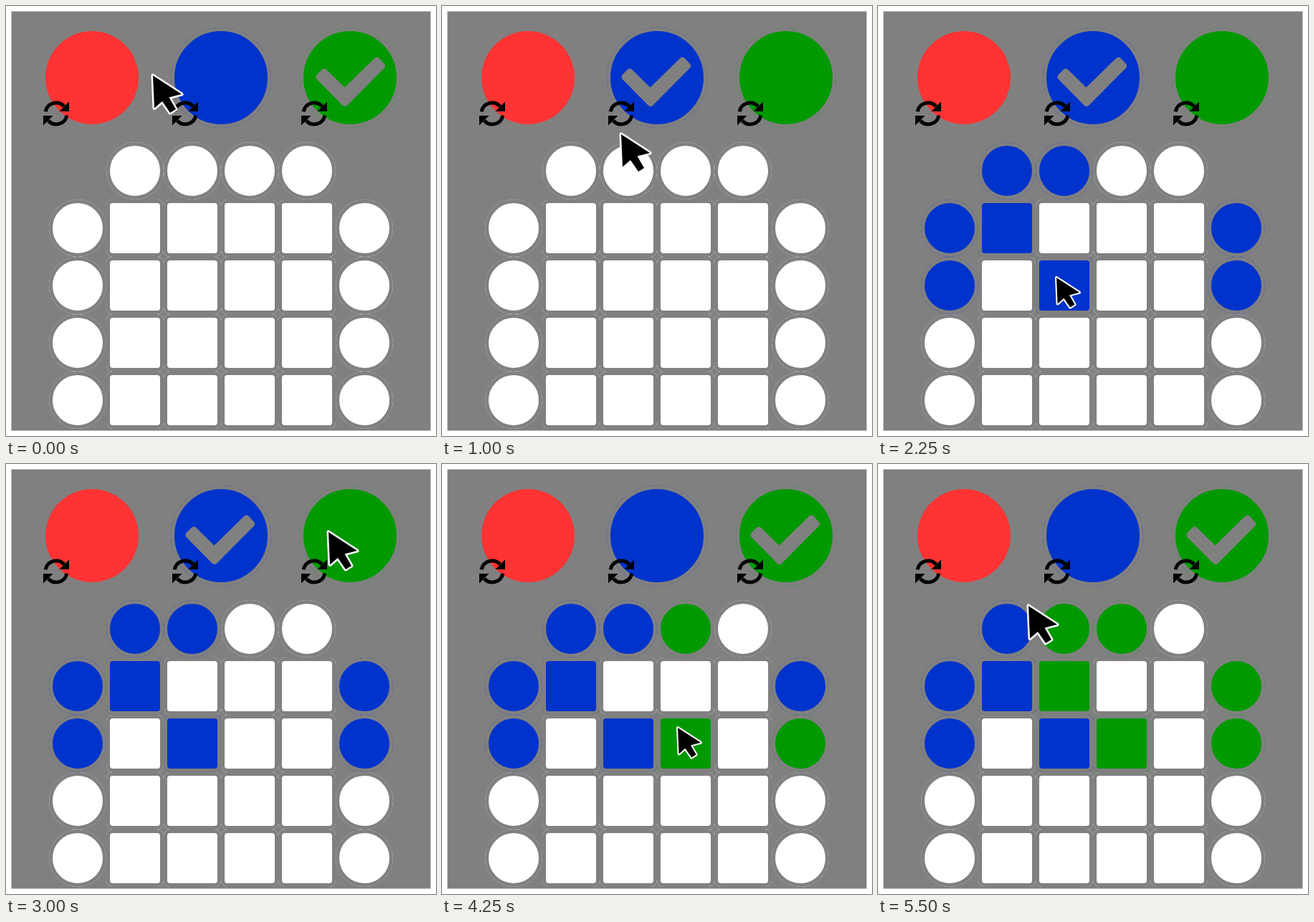
An HTML page that plays this animation: 600 by 600 pixels, repeating every 5750 ms.

```html
<!DOCTYPE html>
<html lang="en">
<head>
<meta charset="utf-8">
<title>Colour grid</title>
<style>
  html, body { margin: 0; width: 100%; height: 100%; overflow: hidden; background: #fff; }
  svg { display: block; width: 100vw; height: 100vh; }
  .frame { fill: none; stroke: #808080; stroke-width: 5; }
  .check { fill: #808080; stroke: #808080; stroke-width: 9; stroke-linejoin: round; }
  .arc { fill: none; stroke: #000; stroke-width: 5; }
  .cursor { fill: #000; stroke: #fff; stroke-width: 5; paint-order: stroke; stroke-linejoin: round; }
</style>
</head>
<body>
<svg id="stage" viewBox="0 0 600 600">
  <defs>
    <g id="arrow">
      <path class="arc" d="M-14.8 -2.6A14.9 14.9 0 0 1 11 -10"/>
      <path d="M18 -16.5V-3H4.5Z"/>
    </g>
    <g id="reload">
      <use href="#arrow"/>
      <use href="#arrow" transform="rotate(180)"/>
    </g>
  </defs>
  <rect x="7.5" y="7.5" width="585" height="585" fill="#808080"/>
  <g id="board"></g>
  <path id="check" class="check" d="M-45 -1L-38 -8L-9.5 20L35.5 -24L42.5 -16.5L-9 35.5Z"/>
  <g id="icons"></g>
  <path id="cursor" class="cursor" d="M0 0L2 45.5L13 36L24 52L32 47L22.5 30.5L40 26Z"/>
</svg>
<script>
const RED = '#ff3333', BLUE = '#0033cc', GREEN = '#009900', WHITE = '#ffffff';
const STEP = 250;
const $ = id => document.getElementById(id);
const board = $('board');

function add(parent, tag, attrs) {
  const el = document.createElementNS('http://www.w3.org/2000/svg', tag);
  for (const key in attrs) el.setAttribute(key, attrs[key]);
  return parent.appendChild(el);
}

function circle(cx, cy, r, fill = WHITE) {
  const el = add(board, 'circle', { cx, cy, r, fill });
  add(board, 'circle', { cx, cy, r: r - 2.5, class: 'frame' });
  return el;
}

function cell(x, y) {
  const el = add(board, 'rect', { x, y, width: 80, height: 80, rx: 9, fill: WHITE });
  add(board, 'rect', { x: x + 2.5, y: y + 2.5, width: 75, height: 75, rx: 6.5, class: 'frame' });
  return el;
}

[RED, BLUE, GREEN].forEach((color, i) => {
  const x = 120 + 180 * i;
  if (color === RED) add(board, 'circle', { cx: x, cy: 100, r: 65, fill: color });
  else circle(x, 100, 70, color);
  add($('icons'), 'use', { href: '#reload', transform: `translate(${x - 50} 150)` });
});

const top4 = [], left = [], right = [], cells = [];
for (let i = 0; i < 4; i++) {
  const y = 310 + 80 * i;
  top4[i] = circle(180 + 80 * i, 230, 40);
  left[i] = circle(100, y, 40);
  right[i] = circle(500, y, 40);
  cells[i] = [0, 1, 2, 3].map(c => cell(140 + 80 * c, y - 40));
}

// Cursor tip at every step
const path = [
  [205, 97], [246, 88], [290, 95], [290, 95], [250, 179], [180, 302], [180, 302], [214, 341],
  [249, 379], [249, 379], [305, 311], [385, 195], [450, 95], [450, 95], [370, 164], [347, 281],
  [329, 368], [329, 368], [290, 332], [250, 300], [250, 300], [235, 258], [210, 198]
];
const presses = [3, 6, 9, 13, 17, 20];

// Each event recolours its shapes from the given step on
const events = [
  [6, BLUE, [cells[0][0], top4[0], left[0], right[0]]],
  [9, BLUE, [cells[1][1], top4[1], left[1], right[1]]],
  [17, GREEN, [cells[1][2], top4[2], right[1]]],
  [20, GREEN, [cells[0][1], top4[1], right[0]]]
];
const shapes = [...top4, ...left, ...right, ...cells.flat()];

function show(step) {
  const [x, y] = path[step];
  const scale = presses.includes(step) ? 0.8 : 1;
  $('cursor').setAttribute('transform', `translate(${x} ${y}) scale(${scale})`);

  const checkX = step < 3 ? 482 : step < 13 ? 300 : 480;
  $('check').setAttribute('transform', `translate(${checkX} 100)`);

  for (const shape of shapes) shape.setAttribute('fill', WHITE);
  for (const [from, color, group] of events) {
    if (step >= from) for (const shape of group) shape.setAttribute('fill', color);
  }
}

let shown = -1;
const start = performance.now();
function tick() {
  const step = Math.floor((performance.now() - start) / STEP) % path.length;
  if (step !== shown) show(shown = step);
  requestAnimationFrame(tick);
}
tick();
</script>
</body>
</html>
```
